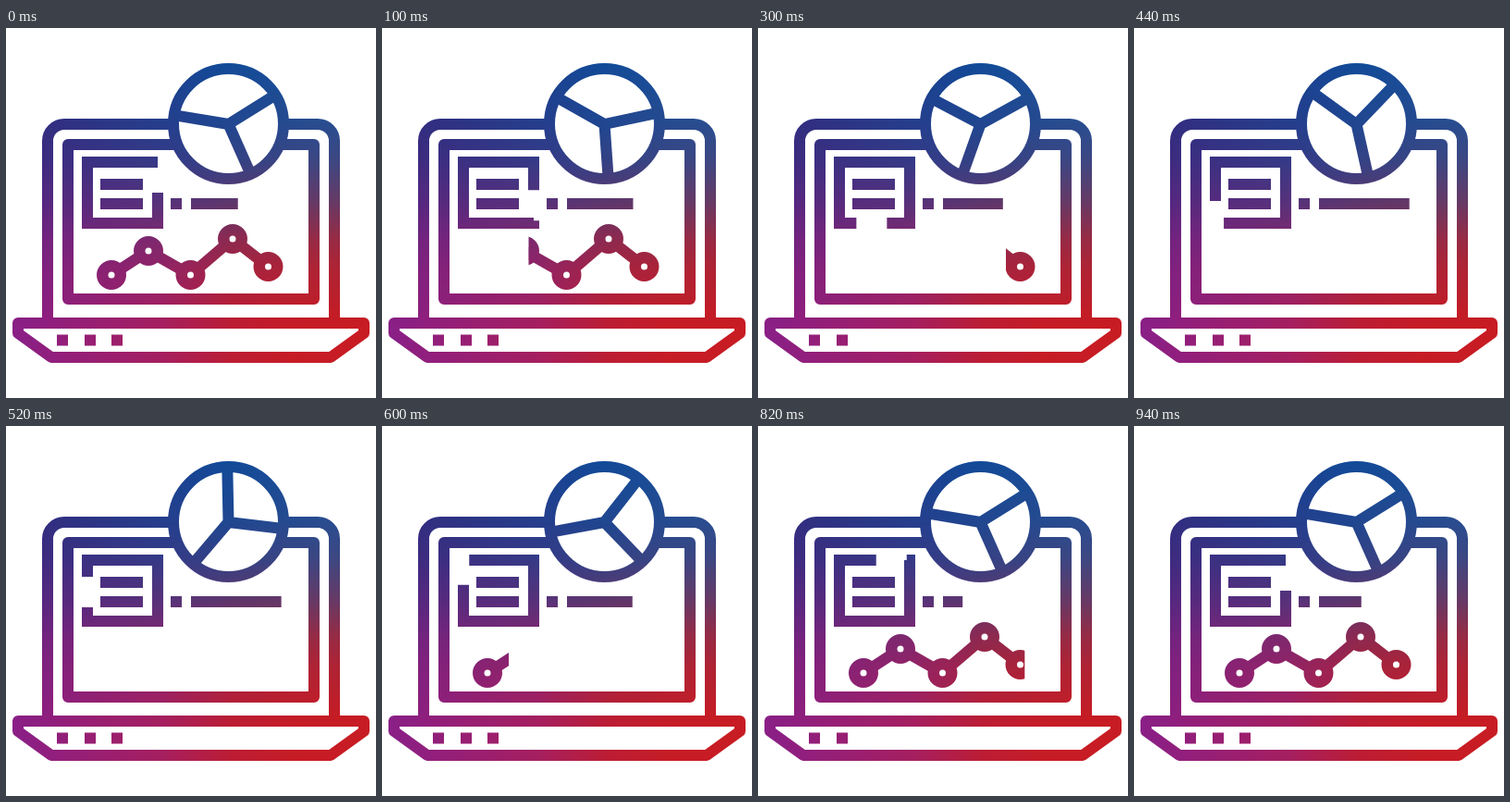
Recreate the animation shown at these times as an HTML page. Size 400 px wide and 400 px high, loop 960 ms.

```html
<!DOCTYPE html>
<html lang="en">
<head>
<meta charset="utf-8">
<title>Laptop analytics icon</title>
<style>
  html, body { margin: 0; width: 100%; height: 100%; overflow: hidden; background: #fff; }
  svg { display: block; width: 100%; height: 100%; }
</style>
</head>
<body>
<svg viewBox="0 0 400 400">
  <defs>
    <linearGradient id="warm" gradientUnits="userSpaceOnUse" x1="0" y1="0" x2="400" y2="0">
      <stop offset=".03" stop-color="#8a1f86"/>
      <stop offset=".42" stop-color="#a51f60"/>
      <stop offset=".61" stop-color="#bc1d34"/>
      <stop offset=".78" stop-color="#c61c26"/>
      <stop offset="1" stop-color="#c81c22"/>
    </linearGradient>
    <linearGradient id="cool" gradientUnits="userSpaceOnUse" x1="40" y1="0" x2="360" y2="0">
      <stop offset="0" stop-color="#2a2f80"/>
      <stop offset=".6" stop-color="#124a98"/>
      <stop offset="1" stop-color="#1c5299"/>
    </linearGradient>
    <linearGradient id="fade" gradientUnits="userSpaceOnUse" x1="0" y1="0" x2="0" y2="400">
      <stop offset=".1" stop-color="#fff"/>
      <stop offset=".26" stop-color="#fff" stop-opacity=".92"/>
      <stop offset=".3625" stop-color="#fff" stop-opacity=".8"/>
      <stop offset=".475" stop-color="#fff" stop-opacity=".55"/>
      <stop offset=".57" stop-color="#fff" stop-opacity=".28"/>
      <stop offset=".65" stop-color="#fff" stop-opacity=".14"/>
      <stop offset=".8" stop-color="#fff" stop-opacity="0"/>
    </linearGradient>
    <mask id="top" maskUnits="userSpaceOnUse" x="0" y="0" width="400" height="400">
      <rect width="400" height="400" fill="url(#fade)"/>
    </mask>
    <clipPath id="wipe"><rect id="window" y="200" height="100"/></clipPath>
    <mask id="icon" maskUnits="userSpaceOnUse" x="0" y="0" width="400" height="400">
      <g fill="none" stroke="#fff" stroke-width="12">
        <path d="M45 319V122A18 18 0 0 1 63 104H181M300 104H337A18 18 0 0 1 355 122V319"/>
        <path stroke-linejoin="round" d="M185 126H67V293H333V126H296"/>
        <path stroke-linejoin="round" d="M13 319H387V330L351 356H49L13 330Z"/>
        <circle cx="240.5" cy="103.5" r="59.5"/>
        <path id="spokes"/>
        <path id="frame" stroke-dasharray="251 999"
          d="M88 145H164V211H88V145H164V211H88V145H164V211H88V145"/>
        <path d="M102 169H148M102 190H148M178 190H190"/>
        <path d="M55 337.5H67M85 337.5H97"/>
        <path id="dot" d="M114 337.5H126"/>
        <path id="bar"/>
        <g id="chart" clip-path="url(#wipe)">
          <path d="M114 267L154 241L199.5 267L245 228L283.5 258"/>
        </g>
      </g>
    </mask>
  </defs>
  <g mask="url(#icon)">
    <rect width="400" height="400" fill="url(#warm)"/>
    <rect width="400" height="400" fill="url(#cool)" mask="url(#top)"/>
  </g>
</svg>
<script>
const LOOP = 960, STEP = 20, TURN = 700, LAP = 940;
const SIDE = 284; // perimeter of the small frame
const SPOKES = [66, 189.5, 328];
const NODES = [[114, 267], [154, 241], [199.5, 267], [245, 228], [283.5, 258]];
const BAR = [[-190, 218], [160, 276], [290, 264.5], [480, 302], [770, 218], [1120, 276]];
const ERASE = [[0, 96], [200, 221], [300, 268], [390, 302]];
const REVEAL = [[540, 96], [600, 137], [720, 220], [840, 302]];

const $ = id => document.getElementById(id);
const clamp = u => Math.min(1, Math.max(0, u));
const smooth = u => u * u * (3 - 2 * u);
const linear = u => u;

function track(keys, t, ease) {
  let i = 0;
  while (i < keys.length - 2 && t >= keys[i + 1][0]) i++;
  const [t0, a] = keys[i], [t1, b] = keys[i + 1];
  return a + (b - a) * ease(clamp((t - t0) / (t1 - t0)));
}

for (const [x, y] of NODES) {
  const c = document.createElementNS('http://www.w3.org/2000/svg', 'circle');
  const attrs = { cx: x, cy: y, r: 9.75, 'stroke-width': 12.5, fill: '#000' };
  for (const k in attrs) c.setAttribute(k, attrs[k]);
  $('chart').append(c);
}

function draw(t) {
  const turn = 360 * smooth(clamp(t / TURN));
  $('spokes').setAttribute('d', SPOKES.map(deg => {
    const a = (deg + turn) * Math.PI / 180;
    return `M240.5 104L${240.5 + 57 * Math.cos(a)} ${104 + 57 * Math.sin(a)}`;
  }).join(''));

  $('frame').setAttribute('stroke-dashoffset', -(109 + SIDE * clamp(t / LAP)));
  $('bar').setAttribute('d', `M200 190H${track(BAR, t, smooth)}`);

  const phase = t % (LOOP / 2);
  $('dot').setAttribute('visibility', phase >= 220 && phase < 370 ? 'hidden' : 'visible');

  const hiding = t < 470;
  const edge = track(hiding ? ERASE : REVEAL, t, linear);
  $('window').setAttribute('x', hiding ? edge : 0);
  $('window').setAttribute('width', hiding ? 400 - edge : edge);
}

const start = performance.now();
function tick() {
  const t = (performance.now() - start) % LOOP;
  draw(Math.floor(t / STEP) * STEP);
  requestAnimationFrame(tick);
}
draw(0);
requestAnimationFrame(tick);
</script>
</body>
</html>
```
